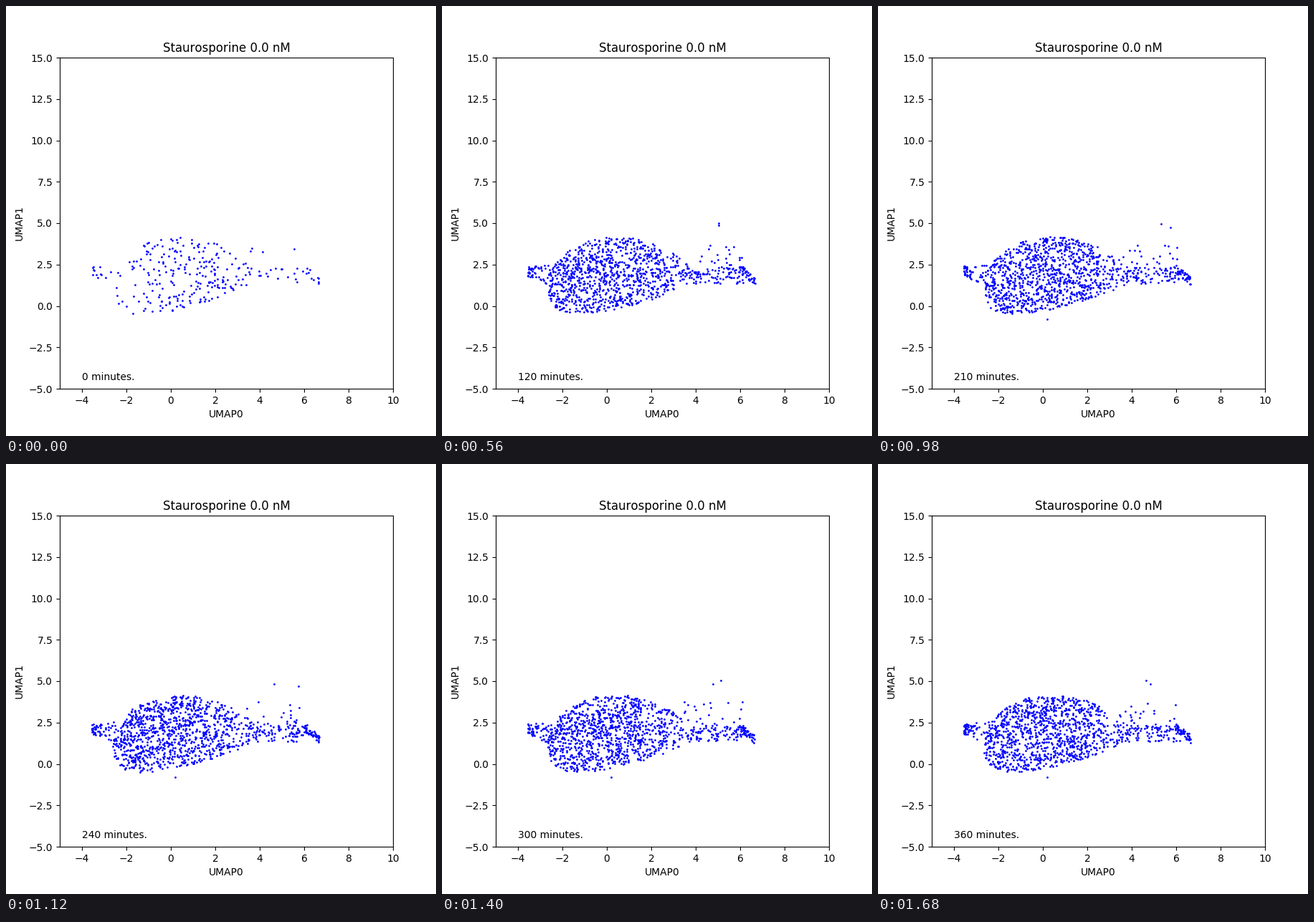
These frames come from a looping animation (600 px wide and 600 px high, 1820 ms). A matplotlib script:

```python
import numpy as np
import matplotlib.pyplot as plt
from matplotlib.animation import FuncAnimation

STEPS = 13
INTERVAL = 140
MINUTES_PER_STEP = 30
LEFT, RIGHT = -2.65, 4.15    # ends of the main body

plt.rcParams["text.kerning_factor"] = 6


def body(rng, n, lean):
    """Egg-shaped cloud that thins out to the right; lean shifts its weight."""
    x = rng.uniform(LEFT, RIGHT, 12 * n)
    u = (x - LEFT) / (RIGHT - LEFT)
    half = 4.7 * u ** 0.4 * (1 - u) ** 0.75
    density = (1 + lean * x) / (1 + np.exp(1.5 * (x - 3.2)))
    keep = rng.uniform(0, 3, x.size) < half * density
    x, half = x[keep][:n], half[keep][:n]
    mid = 2.1 - 0.052 * (x - 1.8) ** 2
    return x, mid + half * rng.uniform(-1, 1, x.size)


def head(rng, n):
    """Tight cluster on the left, fanning out towards the body."""
    t = rng.random(n) ** 1.7
    return -3.55 + 1.1 * t, 2.1 - 0.25 * t + (0.3 + 0.4 * t) * rng.uniform(-1, 1, n)


def tail(rng, n):
    """Narrow band running to the right."""
    return rng.uniform(3.3, 6.2, n), 1.85 + 0.5 * rng.uniform(-1, 1, n)


def tip(rng, n):
    """Cluster that slopes down at the end of the tail."""
    t = rng.random(n)
    return 5.95 + 0.72 * t, 2.25 - 0.75 * t + rng.uniform(-0.25, 0.25, n)


def halo(rng, n):
    """Loose points above the tail."""
    return rng.uniform(3.4, 6.1, n), 2.4 + 1.4 * rng.random(n) ** 1.3


def cloud(step):
    rng = np.random.default_rng(40 + step)
    first = step == 0
    share = 0.23 if first else 0.95 + 0.01 * step
    sizes = [(head, 55), (tail, 90), (tip, 42), (halo, 20)]
    parts = [body(rng, int(980 * share), 0.3 if first else 0)]
    parts += [part(rng, int(n * share)) for part, n in sizes]
    if not first:
        parts.append((rng.uniform(4.6, 5.8, 2), rng.normal(4.9, 0.12, 2)))
    if step >= 6:
        parts.append(([0.18], [-0.82]))
    return np.hstack(parts)


fig, ax = plt.subplots(figsize=(6, 6), dpi=100)
ax.set(xlim=(-5, 10), ylim=(-5, 15), xlabel="UMAP0", ylabel="UMAP1",
       title="Staurosporine 0.0 nM")
dots, = ax.plot([], [], "o", color="blue", markersize=1)
label = ax.text(-4, -4.5, "")


def update(step):
    dots.set_data(*cloud(step))
    label.set_text(f"{step * MINUTES_PER_STEP} minutes.")
    return dots, label


anim = FuncAnimation(fig, update, frames=STEPS, interval=INTERVAL,
                     repeat=True, repeat_delay=0)
plt.show()
```
